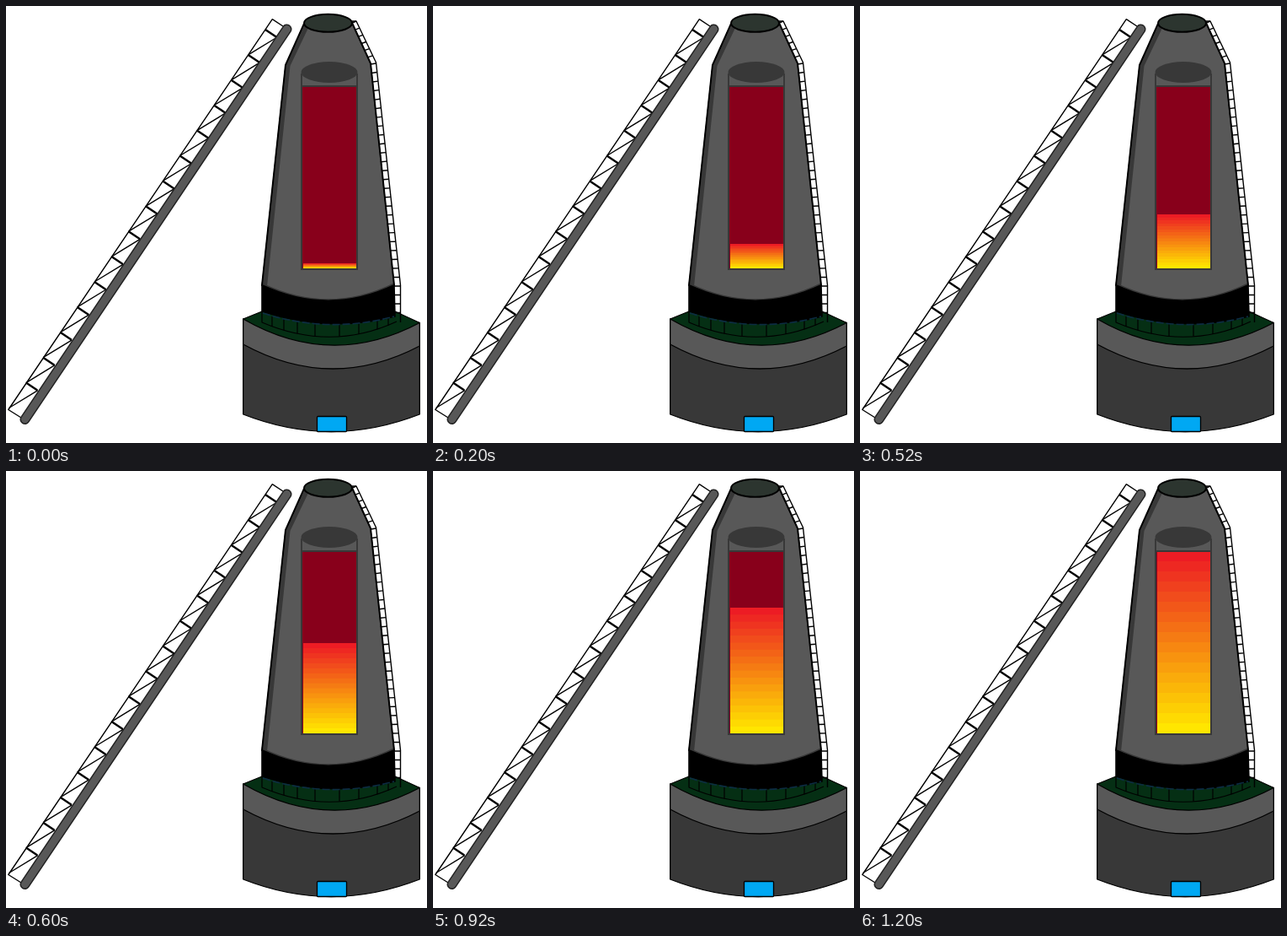
These frames come from a looping animation (500 by 518 pixels, 1400 ms). An HTML page:

```html
<!DOCTYPE html>
<html lang="en">
<head>
<meta charset="utf-8">
<title>Tower charging</title>
<style>
  html, body { margin: 0; width: 100%; height: 100%; overflow: hidden; background: #fff; }
  svg { display: block; width: 100vw; height: 100vh; }
  #fire {
    transform-origin: 0 311px;
    animation: rise 1400ms step-end infinite;
  }
  /* the fire is 216 units tall at full scale */
  @keyframes rise {
    0%      { transform: scaleY(.028); }
    14.286% { transform: scaleY(.1343); }
    28.571% { transform: scaleY(.2963); }
    42.857% { transform: scaleY(.4954); }
    57.143% { transform: scaleY(.6898); }
    71.429% { transform: scaleY(.8843); }
    85.714%, 100% { transform: scaleY(1); }
  }
</style>
</head>
<body>
<svg viewBox="0 0 500 518" fill="none" stroke="#000" stroke-linejoin="round">
  <!-- leaning truss -->
  <path d="M329 24 316.300 15.700 2.800 478.500 18 488" stroke-width="1.4"/>
  <path id="braces" stroke-width="1.4"/>
  <path id="struts" stroke-width="2.400"/>
  <g stroke-linecap="round">
    <path d="M333.500 27.500 22.500 490" stroke="#222" stroke-width="12"/>
    <path d="M333.500 27.500 22.500 490" stroke="#585858" stroke-width="9"/>
  </g>

  <!-- base -->
  <g stroke-width="1.3">
    <path d="M281.700 401V484Q386 525 491.300 484V403Z" fill="#383838"/>
    <path d="M281.700 371V401Q386 458 491.300 403V375.500Z" fill="#585858"/>
    <path d="M281.700 371 304 362H462L491.300 375.500Q386 431 281.700 371Z" fill="#052f14"/>
    <rect x="369.500" y="486.500" width="35" height="18" rx="1" fill="#00a8f3"/>
  </g>

  <!-- railing -->
  <path d="M304 363V375Q386 410 464 374" stroke-width="1.2"/>
  <path id="posts" stroke-width="1.2"/>

  <!-- tower -->
  <path d="M304 331Q383 368 461 331L462 368Q383 388 304 362Z" fill="#000" stroke-width="1.600"/>
  <path d="M305 364Q383 389 461 368" stroke="#0c2c42" stroke-width="1.600" stroke-dasharray="9 3"/>
  <path d="M354 21 332 70 304 331Q383 368 461 331L433 68 411 20Z" fill="#585858"/>
  <path d="M354.500 23 333 70 305 330 310 332.500 337.500 71 359 26Z" fill="#383838" stroke="none"/>
  <path d="M305 329.500Q383 366.500 460 329.500" stroke="#383838" stroke-width="1.500"/>
  <path d="M354 21 332 70 304 331Q383 368 461 331L433 68 411 20" stroke-width="2"/>
  <ellipse cx="382.500" cy="20.300" rx="28.500" ry="10.500" fill="#2c352f" stroke-width="2"/>

  <!-- side ladder -->
  <path d="M411 18H416L439.500 67 468.500 331V375" stroke-width="1.400"/>
  <path id="rungs" stroke-width="1.400"/>

  <!-- window -->
  <ellipse cx="384" cy="78.500" rx="33.500" ry="12.500" fill="#383838" stroke="none"/>
  <rect x="352" y="95" width="64" height="216" fill="#88001b" stroke="none"/>
  <g id="fire" stroke="none" shape-rendering="crispEdges"></g>
  <path d="M351 80V312H417V80M352 95H416" stroke="#383838" stroke-width="2" stroke-linejoin="miter"/>
</svg>
<script>
  const $ = id => document.getElementById(id);
  const mix = (a, b, t) => a + (b - a) * t;
  const line = (x1, y1, x2, y2) => `M${x1} ${y1}L${x2} ${y2}`;
  const draw = (id, n, part) =>
    $(id).setAttribute('d', Array.from({ length: n }, (_, i) => part(i)).join(''));

  // truss bays run down the slope
  const bayX = i => 308 - 20.3 * i;
  const bayY = i => 28 + 29.9 * i;
  draw('struts', 15, i => line(bayX(i), bayY(i), bayX(i) + 13.5, bayY(i) + 9));
  draw('braces', 15, i => line(bayX(i + 1), bayY(i + 1), bayX(i) + 14, bayY(i) + 9));

  const posts = [316, 330, 346, 367, 396, 419, 441, 454];
  draw('posts', posts.length, i => {
    const bow = 1 - ((posts[i] - 384) / 80) ** 2;
    return line(posts[i], 365 + 11 * bow, posts[i], 375 + 17 * bow);
  });

  // ladder sections: inner and outer edges with equal steps between
  const section = (n, a, b, c, d) => i => {
    const t = i / n;
    return line(mix(a[0], b[0], t), mix(a[1], b[1], t), mix(c[0], d[0], t), mix(c[1], d[1], t));
  };
  const upper = section(6, [411, 20], [433, 69], [416, 18], [439.5, 67]);
  const middle = section(25, [433, 69], [461, 332], [439.5, 68], [468.5, 332]);
  const lower = section(4, [461, 332], [462, 374], [468.5, 332], [468.5, 374]);
  draw('rungs', 35, i => i < 6 ? upper(i) : i < 31 ? middle(i - 6) : lower(i - 31));

  // banded fire, red to yellow
  const bands = 18, tall = 216 / bands;
  for (let i = 0; i < bands; i++) {
    const t = i / (bands - 1);
    const r = document.createElementNS('http://www.w3.org/2000/svg', 'rect');
    const attrs = {
      x: 353, y: 95 + i * tall, width: 63, height: tall,
      fill: `rgb(${mix(237, 255, t)},${mix(28, 230, t)},${mix(36, 0, t)})`
    };
    for (const k in attrs) r.setAttribute(k, attrs[k]);
    $('fire').append(r);
  }
</script>
</body>
</html>
```
